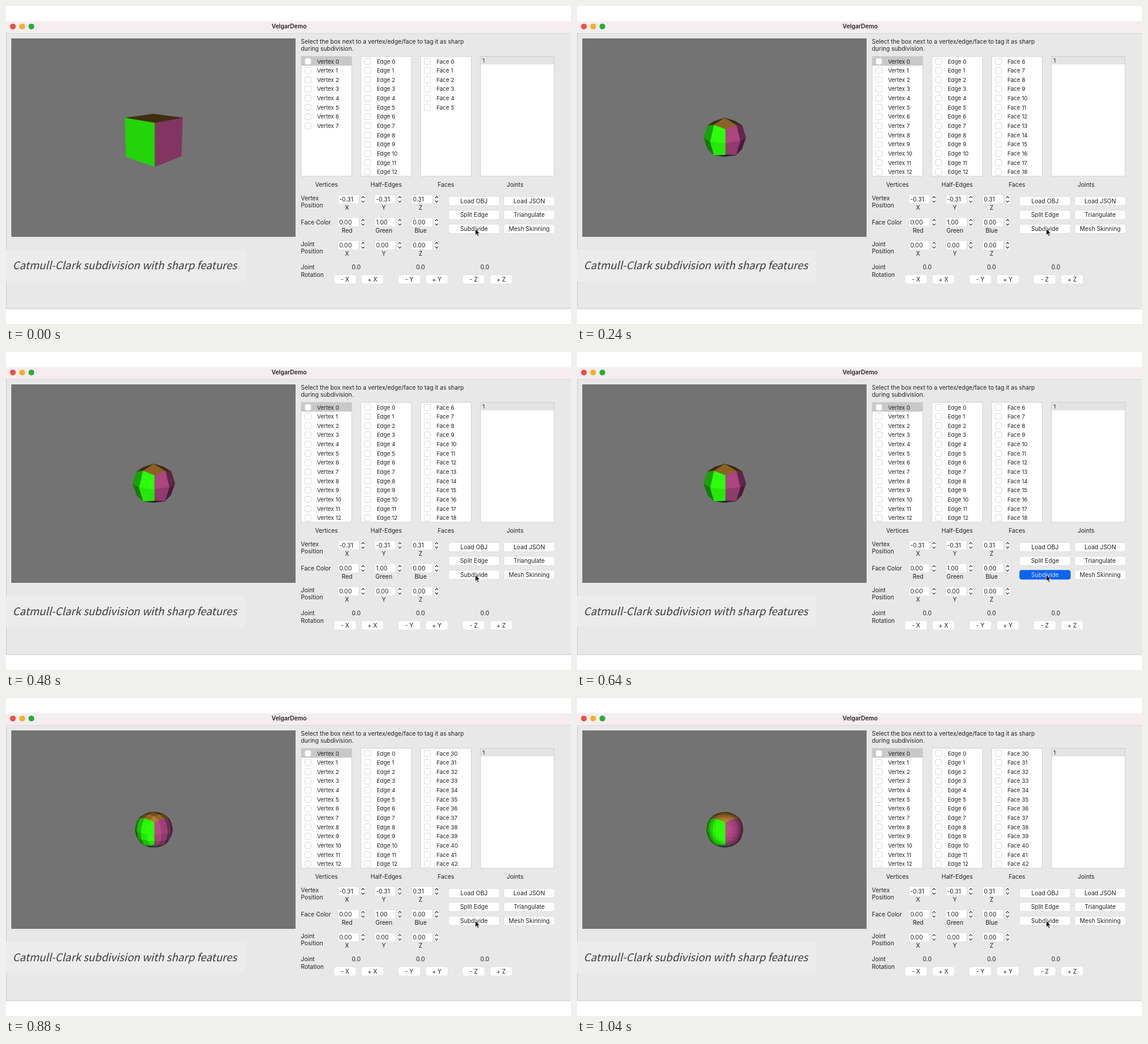
These frames come from a looping animation (960 by 540 pixels, 1120 ms). An HTML page:

```html
<!DOCTYPE html>
<html lang="en">
<head>
<meta charset="utf-8">
<title>Subdivision demo</title>
<style>
  html, body { margin: 0; height: 100%; overflow: hidden; background: #fff; }
  svg { display: block; width: 960px; height: 540px; }
  text { font: 10px Inter, Roboto, sans-serif; fill: #222; white-space: pre; }
  .mid { text-anchor: middle; }
  .row { font-size: 9.5px; }
  .title { font-weight: 600; }
  .caption { font: italic 300 18px "Noto Sans CJK JP", "Noto Sans CJK SC", "Open Sans", sans-serif; fill: #3c3c3c; }
  .button { fill: #fff; stroke: #d2d2d2; stroke-width: .6; }
  .list { fill: #fff; stroke: #cacaca; stroke-width: .8; }
  .box { fill: #fff; stroke: #cfcfcf; stroke-width: .8; }
  .arrow { fill: none; stroke: #333; stroke-width: 1.2; }
  .pressed rect { fill: #0a64ee; stroke: #0a64ee; }
  .pressed text { fill: #cfe2ff; }
</style>
</head>
<body>
<svg id="stage" viewBox="0 0 960 540"></svg>
<script>
const STEP = 80, STEPS = 14, PRESSES = [2, 8, 12];
const FIRST_FACE = [0, 6, 30, 30];
const ROWS = 13, ROW_H = 15.65;

// ---- markup helpers; text is placed by its vertical centre
const rect = (x, y, w, h, attrs) => `<rect x="${x}" y="${y}" width="${w}" height="${h}" ${attrs}/>`;
const label = (x, y, s, cls = '') => `<text x="${x}" y="${y + 3.6}" class="${cls}">${s}</text>`;
const mid = (x, y, s) => label(x, y, s, 'mid');
const button = (x, y, w, s, id = '') =>
  `<g id="${id}">${rect(x - w / 2, y - 7.7, w, 15.6, 'rx="3.5" class="button"')}${mid(x, y, s)}</g>`;
const list = (x, w, id = '') =>
  rect(x, 85.4, w, 203.6, 'class="list"') + `<g id="${id}"></g>`;

function rows(x, name, first, count) {
  let out = '';
  for (let i = 0; i < count; i++) {
    const y = 93.9 + i * ROW_H;
    out += rect(x + 6.3, y - 5.3, 10.6, 10.6, 'rx="2.5" class="box"')
         + label(x + 27, y, `${name} ${first + i}`, 'row');
  }
  return out;
}

function spinner(x, y, value, name) {
  const up = `M${x + 39.5} ${y - 2.3}l2.6 -2.7 2.6 2.7`;
  const down = `M${x + 39.5} ${y + 2.3}l2.6 2.7 2.6 -2.7`;
  return rect(x, y - 7.5, 35, 15, 'fill="#fff" stroke="#d8d8d8" stroke-width=".5"')
    + label(x + 1.7, y, value)
    + rect(x + 37.6, y - 7.6, 9, 15.4, 'rx="3" class="button"')
    + `<path d="${up}${down}" class="arrow"/>` + mid(x + 15, y + 14, name);
}

const spinRow = (y, values, names) =>
  values.map((v, i) => spinner(564.5 + 62.5 * i, y, v, names[i])).join('');

const turnGroup = (axis, i) => {
  const x = 576 + 109.3 * i;
  return mid(x + 19, 443.5, '0.0') + button(x, 464, 38, '- ' + axis) + button(x + 46.7, 464, 38, '+ ' + axis);
};

const $ = id => document.getElementById(id);
const lights = ['#ea5148', '#f3ae2c', '#27ad38'];
const zero = ['0.00', '0.00', '0.00'];

$('stage').innerHTML =
  rect(0, 26, 960, 488.5, 'fill="#e8e8e8"')
  + rect(0, 26, 960, 20, 'fill="#f5edef"') + rect(0, 46, 960, .7, 'fill="#d6d2d3"')
  + rect(0, 46, .8, 468, 'fill="#c4c4c4"') + rect(0, 513.5, 960, 1, 'fill="#d0d0d0"')
  + lights.map((c, i) => `<circle cx="${11.7 + 15.7 * i}" cy="34.8" r="4.9" fill="${c}"/>`).join('')
  + label(481, 34.5, 'VelgarDemo', 'mid title')
  + rect(9, 55, 483, 337, 'fill="#737373"') + '<g id="mesh"></g>'
  + rect(0, 414, 407, 53, 'fill="#ececec"')
  + '<text x="11.3" y="447" class="caption">Catmull-Clark subdivision with sharp features</text>'
  + label(501, 60, 'Select the box next to a vertex/edge/face to tag it as sharp')
  + label(501, 72.5, 'during subdivision.')
  + list(501.4, 86) + rect(502, 86, 85, 15.3, 'fill="#c8c8c8"') + '<g id="vertices"></g>'
  + list(602.9, 86, 'edges') + list(704.4, 86, 'faces') + list(806.2, 125)
  + rect(806.8, 86, 124, 12.3, 'fill="#e4e4e4" stroke="#d0d0d0" stroke-width=".6"')
  + label(809.5, 92, '1', 'row')
  + [['Vertices', 544.5], ['Half-Edges', 646], ['Faces', 747.5], ['Joints', 865]]
      .map(([s, x]) => mid(x, 303, s)).join('')
  + [['Vertex', 326], ['Position', 338.5], ['Face Color', 367.5], ['Joint', 404.5],
     ['Position', 416.8], ['Joint', 443.5], ['Rotation', 456]]
      .map(([s, y]) => label(501, y, s)).join('')
  + spinRow(328.3, ['-0.31', '-0.31', '0.31'], 'XYZ')
  + spinRow(367.3, ['0.00', '1.00', '0.00'], ['Red', 'Green', 'Blue'])
  + spinRow(406.4, zero, 'XYZ')
  + button(795.2, 331.2, 86.5, 'Load OBJ') + button(889, 331.2, 86.5, 'Load JSON')
  + button(795.2, 354.6, 86.5, 'Split Edge') + button(889, 354.6, 86.5, 'Triangulate')
  + button(795.2, 378.2, 86.5, 'Subdivide', 'subdivide') + button(889, 378.2, 86.5, 'Mesh Skinning')
  + ['X', 'Y', 'Z'].map(turnGroup).join('')
  + '<path d="M797.3 378v11.2l2.5-2.3 1.8 4.1 1.9-.8-1.8-4h3.4z" fill="#000" stroke="#fff" stroke-width=".8"/>';

$('edges').innerHTML = rows(602.9, 'Edge', 0, ROWS);

// ---- Catmull-Clark meshes
const add = (a, b) => a.map((v, i) => v + b[i]);
const sub = (a, b) => a.map((v, i) => v - b[i]);
const scale = (a, k) => a.map(v => v * k);
const mean = ps => scale(ps.reduce(add), 1 / ps.length);
const dot = (a, b) => a[0] * b[0] + a[1] * b[1] + a[2] * b[2];
const cross = (a, b) => [0, 1, 2].map(i => {
  const j = (i + 1) % 3, k = (i + 2) % 3;
  return a[j] * b[k] - a[k] * b[j];
});

function cube() {
  const points = Array.from({ length: 8 }, (_, i) => [0, 1, 2].map(k => (i >> k & 1) * 2 - 1));
  const faces = [];
  for (let a = 0; a < 3; a++) for (let s = 0; s < 2; s++) {
    const ids = [[0, 0], [1, 0], [1, 1], [0, 1]]
      .map(([u, v]) => s << a | u << (a + 1) % 3 | v << (a + 2) % 3);
    faces.push({ ids, side: a * 2 + s });
  }
  return { points, faces };
}

function subdivide({ points, faces }) {
  const out = [], edges = new Map();
  const around = points.map(() => ({ faces: [], edges: [] }));
  const key = (a, b) => Math.min(a, b) + '-' + Math.max(a, b);
  const push = p => out.push(p) - 1;
  const centres = faces.map(f => mean(f.ids.map(i => points[i])));

  faces.forEach(({ ids }, f) => ids.forEach((a, i) => {
    const b = ids[(i + 1) % 4], k = key(a, b);
    around[a].faces.push(centres[f]);
    if (!edges.has(k)) edges.set(k, { ends: [a, b], ring: [points[a], points[b]] });
    edges.get(k).ring.push(centres[f]);
  }));

  for (const e of edges.values()) {
    const p = mean(e.ring);
    e.ends.forEach(i => around[i].edges.push(p));
    e.id = push(p);
  }
  // old corners move towards their smoothed edge points and face centres
  const corners = points.map((p, i) => {
    const n = around[i].edges.length;
    const near = add(mean(around[i].faces), mean(around[i].edges));
    return push(scale(add(near, scale(p, n - 2)), 1 / n));
  });

  return {
    faces: faces.flatMap(({ ids, side }, f) => {
      const c = push(centres[f]);
      return ids.map((a, i) => ({
        ids: [corners[a], edges.get(key(a, ids[(i + 1) % 4])).id, c, edges.get(key(ids[(i + 3) % 4], a)).id],
        side
      }));
    }),
    points: out
  };
}

// ---- camera and shading
const YAW = 43.7 * Math.PI / 180, TILT = 14 * Math.PI / 180, DIST = 11, FOCAL = 372.8;
const COLORS = [[90, 110, 90], [174, 70, 130], [125, 135, 135], [195, 138, 52], [90, 110, 90], [45, 270, 10]];

function toCamera([x, y, z]) {
  const depth = x * Math.sin(YAW) + z * Math.cos(YAW);
  return [
    x * Math.cos(YAW) - z * Math.sin(YAW),
    y * Math.cos(TILT) - depth * Math.sin(TILT),
    y * Math.sin(TILT) + depth * Math.cos(TILT)
  ];
}

function project([x, y, z]) {
  const k = FOCAL / (DIST - z);
  return `${(251.2 + x * k).toFixed(2)},${(223.5 - y * k).toFixed(2)}`;
}

function drawMesh({ points, faces }) {
  const seen = points.map(toCamera);
  return faces.map(({ ids, side }) => {
    const quad = ids.map(i => seen[i]), c = mean(quad);
    let n = cross(sub(quad[2], quad[0]), sub(quad[3], quad[1]));
    if (dot(n, c) < 0) n = scale(n, -1);
    const eye = sub([0, 0, DIST], c);
    const facing = dot(n, eye) / Math.hypot(...n) / Math.hypot(...eye);
    if (facing <= 0) return '';
    const color = `rgb(${COLORS[side].map(v => Math.min(255, Math.round(v * (.18 + .93 * facing))))})`;
    return `<polygon points="${quad.map(project).join(' ')}" fill="${color}" stroke="${color}" stroke-width=".4"/>`;
  }).join('');
}

const meshes = [cube()];
while (meshes.length < 4) meshes.push(subdivide(meshes[meshes.length - 1]));
const pictures = meshes.map(drawMesh);

// ---- playback
let shown = -1;
function frame(now) {
  const step = Math.floor(now / STEP) % STEPS;
  const level = PRESSES.filter(p => p < step).length;
  $('subdivide').setAttribute('class', PRESSES.includes(step) ? 'pressed' : '');
  if (level !== shown) {
    shown = level;
    $('mesh').innerHTML = pictures[level];
    $('vertices').innerHTML = rows(501.4, 'Vertex', 0, level ? ROWS : 8);
    $('faces').innerHTML = rows(704.4, 'Face', FIRST_FACE[level], level ? ROWS : 6);
  }
  requestAnimationFrame(frame);
}
frame(0);
</script>
</body>
</html>
```
